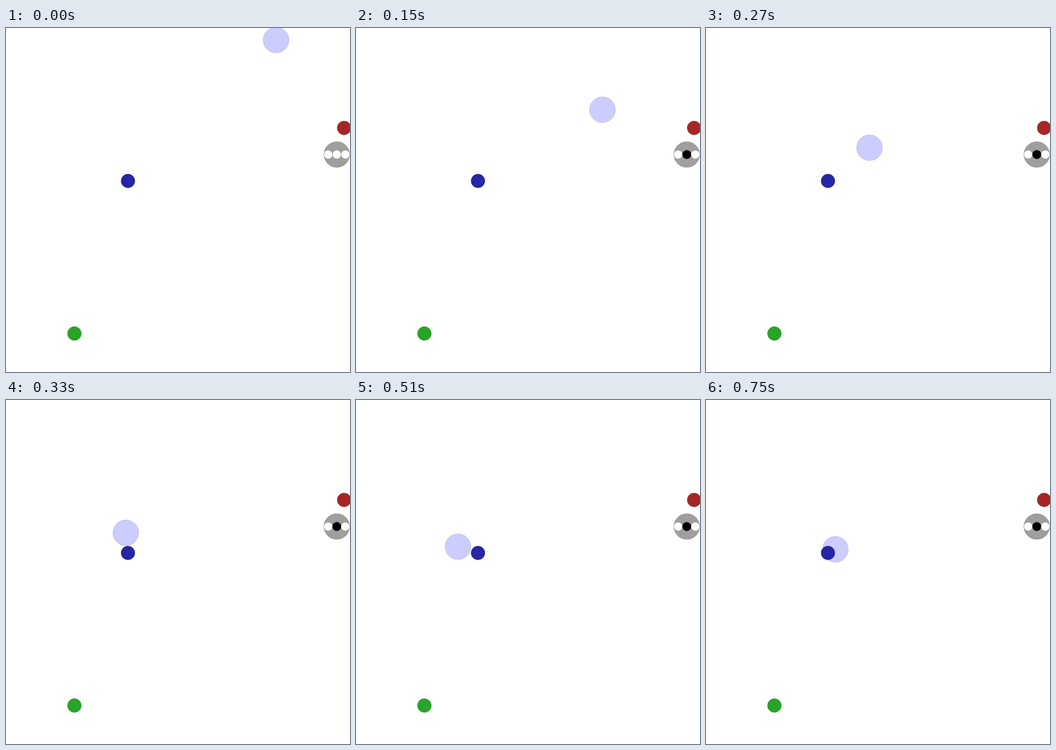
Write an HTML page that moves like this. It is 700 px wide and 700 px high and loops after 0.78 s.

```html
<!DOCTYPE html>
<html lang="en">
<head>
<meta charset="utf-8">
<title>Particles</title>
<style>
  html, body { margin: 0; width: 100%; height: 100%; overflow: hidden; background: #fff; }
  svg { display: block; width: 100%; height: 100%; }
</style>
</head>
<body>
<svg id="world" viewBox="0 0 700 700"></svg>
<script>
const STEP = 30, UNIT = 350;
const PUSH = 0.05 * UNIT, DRAG = 0.75;
// One push per step: Down, Left, Right, or none
const MOVES = 'DDDLLLLDLL.R.....R.......';
const DIRS = { D: [0, 1], L: [-1, 0], R: [1, 0], '.': [0, 0] };
const COUNT = MOVES.length + 1;
const world = document.getElementById('world');

function ring(r, sides = 30) {
  return Array.from({ length: sides }, (_, i) => {
    const a = 2 * Math.PI * i / sides;
    return (r * Math.cos(a)).toFixed(3) + ',' + (r * Math.sin(a)).toFixed(3);
  }).join(' ');
}

// Disc with an edge at half its brightness and half its opacity
function disc(x, y, size, rgb, alpha = 1) {
  const el = document.createElementNS('http://www.w3.org/2000/svg', 'polygon');
  const edge = rgb.map(c => Math.round(c / 2));
  el.setAttribute('points', ring(size * UNIT));
  el.style.transform = `translate(${x}px, ${y}px)`;
  el.style.fill = `rgba(${rgb}, ${alpha})`;
  el.style.stroke = `rgba(${edge}, ${alpha / 2})`;
  world.append(el);
  return el;
}

function play(el, frames) {
  frames = frames.map((f, i) => ({
    ...f, offset: Math.max(0, i / COUNT - 1e-5), easing: 'steps(1, end)'
  }));
  frames.push({ ...frames[frames.length - 1], offset: 1 });
  el.animate(frames, { duration: COUNT * STEP, iterations: Infinity }).startTime = 0;
}

function path(x, y) {
  const points = [[x, y]];
  let vx = 0, vy = 0;
  for (const move of MOVES) {
    const [dx, dy] = DIRS[move];
    vx = vx * DRAG + dx * PUSH;
    vy = vy * DRAG + dy * PUSH;
    points.push([x += vx, y += vy]);
  }
  return points;
}

const speaker = { x: 673.1, y: 257.5 };
disc(speaker.x, speaker.y, 0.075, [64, 64, 64], 0.5);
const dots = [-1, 0, 1].map(i =>
  disc(speaker.x + i * 0.05 * UNIT, speaker.y, 0.025, [255, 255, 255]));

const listener = disc(549.5, 24.5, 0.075, [153, 153, 255], 0.5);

disc(688, 203.3, 0.04, [166, 38, 38]);
disc(139.2, 621.7, 0.04, [38, 166, 38]);
disc(248.2, 311.2, 0.04, [38, 38, 166]);

play(listener, path(549.5, 24.5).map(([x, y]) => ({
  transform: `translate(${x.toFixed(2)}px, ${y.toFixed(2)}px)`
})));

// The middle signal is lit from the first step on
play(dots[1], Array.from({ length: COUNT }, (_, i) => i
  ? { fill: 'rgb(0, 0, 0)', stroke: 'rgba(0, 0, 0, 0.5)' }
  : { fill: 'rgb(255, 255, 255)', stroke: 'rgba(128, 128, 128, 0.5)' }));
</script>
</body>
</html>
```
